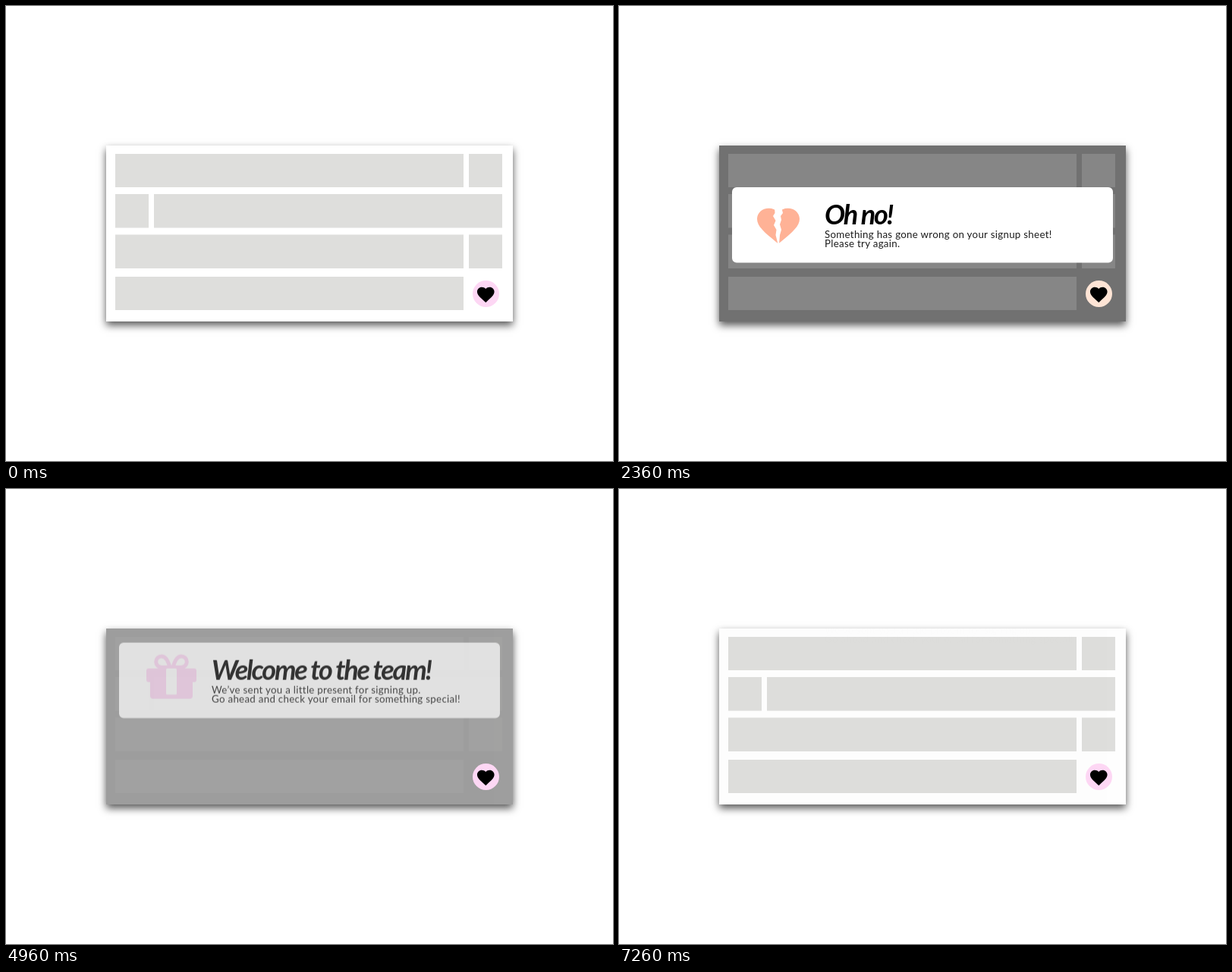
An HTML page for the animation above (7.66 s loop, 800 px wide and 600 px high).

```html
<!DOCTYPE html>
<html lang="en">
<head>
<meta charset="utf-8">
<title>Signup messages</title>
<style>
  html, body { margin: 0; width: 100%; height: 100%; overflow: hidden; background: #fff; }
  svg { display: block; width: 800px; height: 600px; }

  .panel { position: absolute; left: 132px; top: 184px; width: 536px; height: 232px;
           background: #fff; box-shadow: 0 5px 10px rgba(0, 0, 0, .66); }
  svg { position: absolute; left: 0; top: 0; }

  .error, .success { opacity: 0; animation: 7660ms ease infinite; }
  .error { animation-name: error; }
  .success { animation-name: success; }
  .card { --lift: -116px; }
  .dim { --lift: 0px; }

  /* 400 ms in and 400 ms out for each message */
  @keyframes error {
    0%, 15.927% { opacity: 0; transform: translateY(var(--lift)); }
    21.149%, 41.775% { opacity: 1; transform: translateY(0); }
    46.997%, 100% { opacity: 0; transform: translateY(var(--lift)); }
  }
  @keyframes success {
    0%, 62.663% { opacity: 0; transform: translateY(var(--lift)); }
    67.885%, 90.078% { opacity: 1; transform: translateY(0); }
    95.3%, 100% { opacity: 0; transform: translateY(var(--lift)); }
  }

  .button { fill: #fdd7f4; animation: tint 7660ms step-end infinite; }
  @keyframes tint {
    0% { fill: #fdd7f4; }
    16.188% { fill: #fee4d5; }
    42.037%, 100% { fill: #fdd7f4; }
  }

  .title { font: italic 700 36px Lato, sans-serif; letter-spacing: -.06em; }
  .body { font: 13.3px Lato, sans-serif; letter-spacing: .3px; fill: #1c1c1c; }
</style>
</head>
<body>
<div class="panel"></div>
<svg viewBox="0 0 800 600">
  <defs>
    <clipPath id="frame"><rect x="132" y="184" width="536" height="232"/></clipPath>
    <path id="bars" d="M144 195h459v44h-459z M610 195h44v44h-44z
                       M144 248h44v44.5h-44z M195 248h459v44.5h-459z
                       M144 301.5h459v44.5h-459z M610 301.5h44v44.5h-44z
                       M144 357h459v44h-459z"/>
    <g id="shade">
      <rect x="132" y="184" width="536" height="232" fill="#717171"/>
      <use href="#bars" fill="#868686"/>
    </g>
    <rect id="sheet" x="149" y="239" width="502" height="99.5" rx="6" fill="#fff"/>
    <path id="heart" d="M12 21.35l-1.45-1.32C5.4 15.36 2 12.28 2 8.5 2 5.42 4.42 3 7.5 3c1.74 0 3.41.81 4.5 2.09C13.09 3.81 14.76 3 16.5 3 19.58 3 22 5.42 22 8.5c0 3.78-3.4 6.86-8.55 11.54z"/>
    <path id="loop" d="M216 271.5H205a7.2 7.2 0 0 1 0-14.6c5.500 0 8.500 5.500 11 14.600z"/>
  </defs>

  <use href="#bars" fill="#dededc"/>

  <g clip-path="url(#frame)">
    <g class="error dim"><use href="#shade"/></g>
    <g class="error card">
      <use href="#sheet"/>
      <use href="#heart" fill="#ffb296" transform="translate(176.4 259.100) scale(2.8 2.55)"/>
      <path fill="#fff" d="M205 265l9 0 2 8-3 4 1 5-2 6 2 7-2 7-1.200 14h-.8l-3.500-14 1-7-3.500-6 2.500-6-3.500-6 2.500-4z"/>
      <text class="title" x="271" y="287.500">Oh no!</text>
      <text class="body" x="271" y="305.500">Something has gone wrong on your signup sheet!</text>
      <text class="body" x="271" y="317.500">Please try again.</text>
    </g>

    <g class="success dim"><use href="#shade"/></g>
    <g class="success card">
      <use href="#sheet"/>
      <g fill="none" stroke="#fdd7f4" stroke-width="5" stroke-linejoin="round">
        <use href="#loop"/>
        <use href="#loop" transform="translate(436 0) scale(-1 1)"/>
      </g>
      <g fill="#fdd7f4">
        <rect x="185" y="273" width="66" height="18" rx="3"/>
        <path d="M190 288h56v21a4 4 0 0 1-4 4h-48a4 4 0 0 1-4-4z"/>
      </g>
      <rect x="211" y="273" width="14" height="34.500" rx="1.500" fill="#fff"/>
      <text class="title" x="271" y="287.500">Welcome to the team!</text>
      <text class="body" x="271" y="305.500">We’ve sent you a little present for signing up.</text>
      <text class="body" x="271" y="317.500">Go ahead and check your email for something special!</text>
    </g>
  </g>

  <circle class="button" cx="632.5" cy="379.5" r="17.5"/>
  <use href="#heart" transform="translate(618.7 367.4) scale(1.13 1.1)"/>
</svg>
</body>
</html>
```
